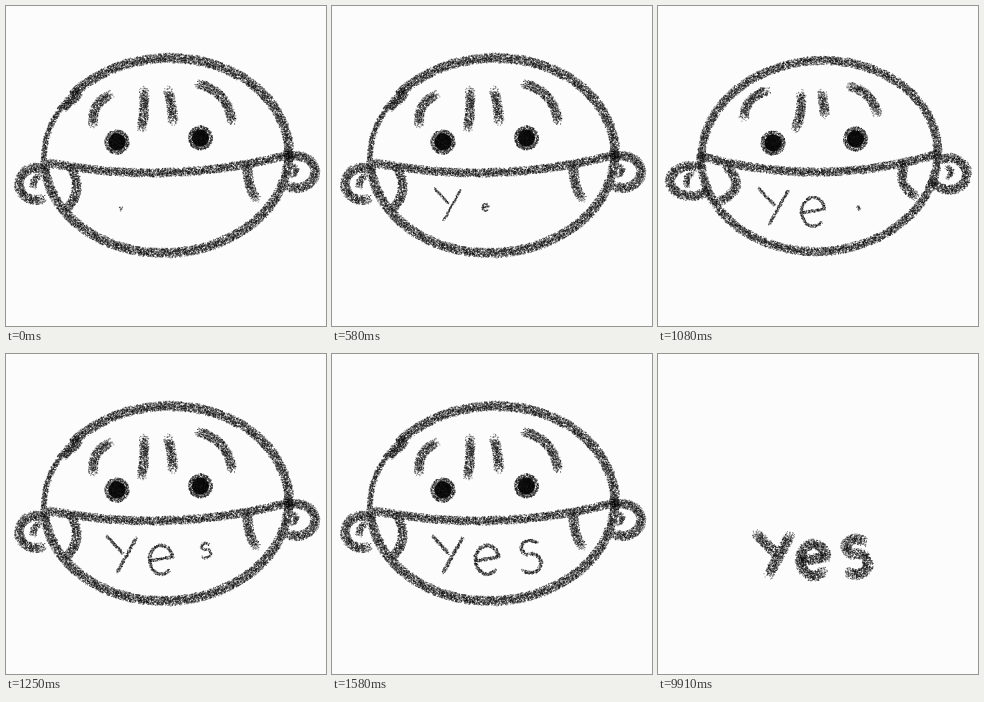
An HTML page with a canvas that plays this animation: 320x320 px, repeating every 10 s.

```html
<!DOCTYPE html>
<html lang="en">
<head>
<meta charset="utf-8">
<title>Yes</title>
<style>
  html, body { margin: 0; width: 100%; height: 100%; overflow: hidden; background: #fcfcfc; }
  canvas { display: block; width: 100vw; height: 100vh; }
</style>
</head>
<body>
<canvas id="stage" width="320" height="320"></canvas>
<script>
const SIZE = 320, LOOP = 10000, GONE = 9910;
const LAST = 22, THICKEN = 19, HOP = 6;
const { PI, sin, cos } = Math;

const mix = (a, b, t) => a + (b - a) * t;
const clamp = v => Math.max(0, Math.min(1, v));
const sample = (fn, n = 32) => Array.from({ length: n + 1 }, (_, i) => fn(i / n));

// A line from one point to another that bulges sideways by bend.
function bow(x1, y1, x2, y2, bend = 0) {
  const dx = x2 - x1, dy = y2 - y1, len = Math.hypot(dx, dy);
  return sample(t => {
    const k = 4 * t * (1 - t) * bend / len;
    return [x1 + dx * t - dy * k, y1 + dy * t + dx * k];
  });
}

// Part of an ellipse.
function ring(cx, cy, rx, ry, from, to, tilt = 0) {
  return sample(t => {
    const a = mix(from, to, t), x = rx * cos(a), y = ry * sin(a);
    return [cx + x * cos(tilt) - y * sin(tilt), cy + x * sin(tilt) + y * cos(tilt)];
  }, 64);
}

function random(seed) {
  return () => {
    seed = (seed + 0x6D2B79F5) | 0;
    let x = Math.imul(seed ^ seed >>> 15, 1 | seed);
    x = x + Math.imul(x ^ x >>> 7, 61 | x) ^ x;
    return ((x ^ x >>> 14) >>> 0) / 4294967296;
  };
}

function speck(ctx, rnd, x, y, radius) {
  const a = rnd() * 2 * PI, d = Math.sqrt(rnd()) * radius;
  ctx.fillRect(x + cos(a) * d - 0.5, y + sin(a) * d - 0.5, 1, 1);
}

function crayon(ctx, rnd, pts, width) {
  ctx.fillStyle = 'rgba(0,0,0,.5)';
  for (let i = 1; i < pts.length; i++) {
    const [x1, y1] = pts[i - 1], [x2, y2] = pts[i];
    const count = Math.hypot(x2 - x1, y2 - y1) * width * 1.65;
    for (let n = rnd(); n < count; n++) {
      const t = rnd();
      speck(ctx, rnd, mix(x1, x2, t), mix(y1, y2, t), width / 2);
    }
  }
}

function eye(ctx, rnd, x, y) {
  ctx.fillStyle = 'rgba(0,0,0,.9)';
  ctx.beginPath();
  ctx.arc(x, y, 8.5, 0, 2 * PI);
  ctx.fill();
  ctx.fillStyle = 'rgba(0,0,0,.5)';
  for (let n = 0; n < 900; n++) speck(ctx, rnd, x, y, 12.3);
}

function sketch(seed, paint) {
  const layer = document.createElement('canvas');
  layer.width = layer.height = SIZE;
  const ctx = layer.getContext('2d'), rnd = random(seed);
  paint((pts, width = 10) => crayon(ctx, rnd, pts, width), (x, y) => eye(ctx, rnd, x, y));
  return layer;
}

const faces = [
  sketch(7, (line, dot) => {
    // head and mask edge
    line(ring(160.5, 149.5, 122.5, 97.5, -2.4, PI, -0.05));
    line(ring(160.5, 149.5, 122.5, 97.5, PI, 3.95, -0.05), 6);
    line(bow(58, 103, 74, 89), 7);
    line(bow(43, 157, 285, 148, 14), 9);
    // ears and straps
    line(ring(30, 178, 17, 16, 1.2, 5.1));
    line(bow(33, 170, 27, 181, 2), 7);
    line(ring(291, 166, 18, 16, -2.1, 2.1));
    line(bow(287, 160, 286, 169, -4), 6);
    line(bow(66, 164, 61, 202, -7));
    line(bow(242, 160, 250, 192, 3));
    // brows and wrinkles
    line(bow(87, 118, 104, 89, -6));
    line(bow(193, 78, 226, 115, -8));
    line(bow(138, 85, 136, 122, -1));
    line(bow(162, 85, 167, 115, -1));
    dot(111, 136);
    dot(194.5, 132);
  }),
  sketch(19, (line, dot) => {
    line(ring(161.5, 150, 118.5, 95.5, 0, 2 * PI, -0.07), 9);
    line(bow(42, 150, 280, 148, 17), 9);
    line(ring(33, 175, 21, 15, 0.7, 5.1));
    line(bow(34, 168, 29, 180, 3), 7);
    line(ring(291, 168, 18, 16, -2, 2.7));
    line(bow(289, 161, 290, 171, -4), 6);
    line(bow(68, 160, 62, 195, -13));
    line(bow(247, 158, 258, 190, 8));
    line(bow(86, 111, 109, 85, -6));
    line(bow(192, 81, 219, 107, -6));
    line(bow(143, 88, 138, 122, -2));
    line(bow(164, 87, 167, 108));
    dot(115, 137);
    dot(197.5, 133);
  })
];

const letters = [
  { born: 0, grow: 8, x: 115, y: 203, strokes: [bow(99, 180, 117, 199), bow(132, 182, 111, 220)] },
  { born: 6, grow: 6, x: 153, y: 204, strokes: [
    bow(143, 207, 167, 203), ring(155.5, 206, 13, 16, -0.15, -5.5)
  ] },
  { born: 13, grow: 5, x: 201, y: 202, strokes: [
    ring(198, 193, 10, 8, -0.7, -4.4), ring(198, 210, 12, 10.5, -1.6, 2.3)
  ] }
];

// Letters grow from a point with a small hop, then all thicken together.
function drawText(ctx, step) {
  const bold = clamp((step - THICKEN) / (LAST - THICKEN));
  const width = mix(2 + 0.1 * Math.min(step, THICKEN), 11, bold);
  letters.forEach(({ born, grow, x, y, strokes }, i) => {
    if (step < born) return;
    const p = clamp((step - born) / grow);
    const scale = mix(0.1, 1, p) * mix(0.9, 1, bold), lift = HOP * sin(PI * p);
    const rnd = random(40 + i);
    for (const pts of strokes) {
      const placed = pts.map(([px, py]) => [mix(x, px, scale), mix(y, py, scale) - lift]);
      crayon(ctx, rnd, placed, width * mix(0.7, 1, p));
    }
  });
}

const ctx = document.getElementById('stage').getContext('2d');
const startOf = step => Math.floor(step * 25 / 3) * 10;
let shown = -1;

function stepAt(t) {
  if (t >= GONE) return LAST + 1;
  let step = 0;
  while (step < LAST && startOf(step + 1) <= t) step++;
  return step;
}

function draw(step) {
  ctx.clearRect(0, 0, SIZE, SIZE);
  // The face swaps every second step.
  if (step <= LAST) ctx.drawImage(faces[(step + 1 >> 1) % 2], 0, 0);
  drawText(ctx, step);
}

function tick() {
  const step = stepAt(performance.now() % LOOP);
  if (step !== shown) draw(shown = step);
  requestAnimationFrame(tick);
}
tick();
</script>
</body>
</html>
```
